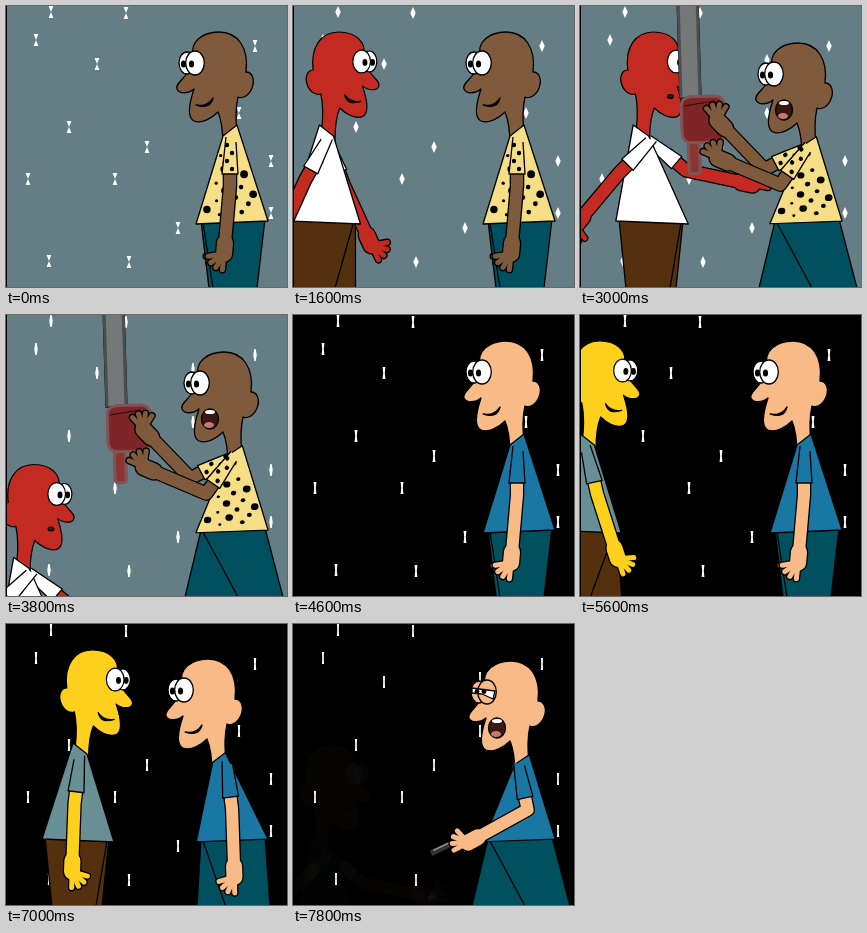
Recreate the animation shown at these times as an HTML page with a canvas. Size 281 by 281 pixels, loop 8000 ms.

```html
<!DOCTYPE html>
<html>
<head>
<meta charset="utf-8">
<style>
html, body { margin: 0; width: 100%; height: 100%; overflow: hidden; background: #000; }
canvas { display: block; width: 100vw; height: 100vh; }
</style>
</head>
<body>
<canvas></canvas>
<script>
const SIZE = 281, LOOP = 8000, STEP = 200, CUT = 4400, SECOND_START = 4600;
const UPPER_ARM = 44, FOREARM = 57;
const canvas = document.querySelector('canvas');
const ctx = canvas.getContext('2d');

// Outlines of the figure, facing left.
const HEAD = new Path2D('M187 50C184 36 196 26 213 26C232 26 243 42 240 66C247 66 249 75 246 82C243 90 236 93 232 91C230 100 229 110 231 128L217 140C217 125 215 113 212 106C206 112 196 118 188 115C180 111 184 95 188 83C182 88 173 88 171 83C169 78 177 74 181 67Z');
const SMILE = new Path2D('M190 99Q201 101 207 92Q204 104 190 99Z');
const SCOWL = new Path2D('M174 53L197 56L195 64L184 59L174 58Z');
const SHIRT = new Path2D('M217 130L231 119L262 215L190 218Z');
const SLEEVE = new Path2D('M-4 -5L-8 32L8 32L6 0');

const SPARKS = [[45, 6], [120, 7], [30, 34], [91, 58], [249, 40], [187, 54], [63, 121],
  [233, 107], [187, 107], [141, 141], [265, 155], [22, 173], [109, 173], [172, 222],
  [265, 207], [43, 255], [123, 256]];

const SCENES = [
  { sky: '#657e85', saw: true, start: -142, arrive: 2240,
    left: { skin: '#c32a22', shirt: '#fff', pants: '#54300f' },
    right: { skin: '#7f5a3c', shirt: '#f5de85', pants: '#00505f', dotted: true },
    aim: { near: [35, 113], far: [62, 136] } },
  { sky: '#000', saw: false, start: -150, arrive: 1800,
    left: { skin: '#fdd01d', shirt: '#688f95', pants: '#54300f' },
    right: { skin: '#f8bb87', shirt: '#1a76a3', pants: '#00505f' },
    aim: { near: [-12, 61], far: [0, 5] } }
];

const mix = (a, b, k) => a + (b - a) * k;
const ramp = (t, from, to) => Math.min(1, Math.max(0, (t - from) / (to - from)));

// A step from a point; 0 degrees is down, 90 is forward (left).
function toward([x, y], degrees, length) {
  const a = degrees * Math.PI / 180;
  return [x - Math.sin(a) * length, y + Math.cos(a) * length];
}

function within(draw) {
  ctx.save();
  draw();
  ctx.restore();
}

function shape(path, fill, outlined = true) {
  ctx.fillStyle = fill;
  ctx.fill(path);
  if (outlined) ctx.stroke(path);
}

function polygon(points, fill, outlined) {
  const path = new Path2D();
  points.forEach(p => path.lineTo(...p));
  path.closePath();
  shape(path, fill, outlined);
}

function oval(x, y, rx, ry, fill, outlined = false) {
  const path = new Path2D();
  path.ellipse(x, y, rx, ry, 0, 0, 7);
  shape(path, fill, outlined);
}

function box(x, y, w, h, r, fill) {
  const path = new Path2D();
  path.roundRect(x, y, w, h, r);
  shape(path, fill);
}

function line(...points) {
  ctx.beginPath();
  points.forEach(p => ctx.lineTo(...p));
  ctx.stroke();
}

// Thick strokes merged under one common outline.
function limbs(strokes, color) {
  within(() => {
    ctx.lineCap = 'round';
    for (const [extra, style] of [[2.6, '#000'], [0, color]]) {
      ctx.strokeStyle = style;
      for (const [width, points] of strokes) {
        ctx.lineWidth = width + extra;
        line(...points);
      }
    }
  });
}

function joints(pose, [upper, fore], dx = 0) {
  const shoulder = [224 + dx + pose.lean * 0.3, 136 + pose.drop * 0.6];
  const elbow = toward(shoulder, upper, UPPER_ARM);
  return { shoulder, elbow, wrist: toward(elbow, fore, FOREARM) };
}

function arm(look, pose, angles, dx) {
  const { shoulder, elbow, wrist } = joints(pose, angles, dx);
  const palm = toward(wrist, angles[1], 11);
  const strokes = [[12, [toward(shoulder, angles[0], 20), elbow, wrist]], [16, [wrist, palm]]];
  for (let i = 0; i < 4; i++) {
    strokes.push([5, [palm, toward(palm, angles[1] + 76 - 25 * i, 16)]]);
  }
  limbs(strokes, look.skin);
  within(() => {
    ctx.translate(...shoulder);
    ctx.rotate(angles[0] * Math.PI / 180);
    shape(SLEEVE, look.shirt);
    if (look.dotted) for (let i = 0; i < 4; i++) oval(i % 2 ? 2 : -3, 3 + 8 * i, 2.2, 2.2, '#000');
  });
}

// Golden-ratio scatter across the widening shirt.
function shirtDots() {
  const count = 17;
  for (let i = 0; i < count; i++) {
    const depth = Math.sqrt((i + 0.5) / count), across = (i * 0.618 + 0.4) % 1;
    const x = mix(mix(222, 196, depth), mix(228, 256, depth), across);
    const r = 2.8 + 1.2 * Math.sin(i * 5);
    oval(x, 124 + 86 * depth, r, r, '#000');
  }
}

function face(look, pose) {
  shape(HEAD, look.skin);
  const height = pose.squint ? 9 : 12;
  for (const [x, rx, ry] of [[181, 8, height - 1], [189, 9.3, height]]) {
    oval(x, 57, rx, ry, pose.angry ? look.skin : '#fff', true);
    if (!pose.angry) oval(x - 3.5, 58, 2.6, 3.6, '#000');
  }
  if (pose.angry) {
    shape(SCOWL, '#fff');
    for (const x of [179, 186]) oval(x, 56.5, 2.4, 2.4, '#000');
  }
  if (pose.shout) {
    oval(199, 93, 8.5, 10, '#3a1712', true);
    oval(198, 99, 5, 3, '#c87870');
    oval(199, 86, 5, 2, '#fff');
  } else if (pose.gasp) {
    oval(195, 94, 3, 2, '#3a1712', true);
  } else {
    shape(SMILE, '#000');
  }
}

function trousers(color, spread) {
  polygon([[195, 215], [259, 213], [mix(251, 277, spread), 282], [mix(203, 179, spread), 282]], color);
  line([197, 217], [mix(207, 232, spread), 282]);
}

function person(look, pose) {
  arm(look, pose, pose.far, -2);
  trousers(look.pants, pose.spread);
  within(() => {
    ctx.translate(pose.lean, pose.drop);
    // The head scales about the forehead.
    ctx.translate(185, 26);
    ctx.scale(pose.headSize, pose.headSize);
    ctx.translate(-185, -26);
    face(look, pose);
  });
  within(() => {
    // Shear the torso so the hem stays put while the collar follows the head.
    const kx = pose.lean / 91, ky = pose.drop / 91;
    ctx.transform(1, 0, -kx, 1 - ky, 216 * kx, 216 * ky);
    shape(SHIRT, look.shirt);
    if (look.dotted) shirtDots();
  });
  if (pose.armed) return;
  arm(look, pose, pose.near);
}

function visitor(scene, u) {
  const x = scene.start * (1 - ramp(u, 0, scene.arrive));
  const swing = Math.cos((x + 16) * Math.PI / 30);
  const shock = ramp(u, 2600, 2800);
  const fall = scene.saw ? 2.6 * ramp(u, 3400, 4200) : ramp(u, 2800, 3200);
  const near = mix(30 * swing - 4, -45, shock), far = -28 * swing - 4;
  within(() => {
    if (!scene.saw) ctx.globalAlpha = mix(1, 0.02, ramp(u, 2800, 3200));
    ctx.translate(298 + x - 35 * fall, 95 * fall);
    ctx.scale(-1, 1);
    person(scene.left, {
      headSize: 0.95, lean: 13 * shock, drop: 0, gasp: shock > 0,
      near: [near, near + 5], far: [mix(far, 50, shock), mix(far + 5, 78, shock)],
      spread: swing > 0 ? swing : -0.4 * swing,
      squint: !scene.saw && u >= 1400 && u < 1800
    });
  });
}

function chainsaw([x, y], shake) {
  within(() => {
    ctx.translate(x - 25 + shake, y - 5);
    ctx.rotate(-0.03);
    box(-22, -220, 21, 160, 0, '#747879');
    ctx.lineWidth = 3;
    ctx.strokeStyle = '#4b4d4e';
    for (const edge of [-21, -2]) line([edge, -220], [edge, -60]);
    ctx.strokeStyle = '#805354';
    box(-15, -16, 11, 32, 3, scene => 0);
    box(-15, -16, 11, 32, 3, '#8d3330');
    box(-21, -61, 43, 46, 9, '#7f2527');
    ctx.lineWidth = 1;
    ctx.strokeStyle = '#2a0c0c';
    line([-18, -52], [12, -56], [18, -48]);
  });
}

function pistol([x, y]) {
  within(() => {
    ctx.translate(x - 12, y + 2);
    ctx.rotate(-0.45);
    box(-38, -6, 40, 7, 1, '#333');
    box(-6, 0, 6, 12, 1, '#222');
    ctx.strokeStyle = '#999';
    line([-34, -4], [-2, -4]);
  });
}

function host(scene, u) {
  const notice = ramp(u, 1800, 2200), reach = ramp(u, 2400, 2800), lunge = ramp(u, 2600, 2800);
  const aim = angles => angles.map((angle, i) => mix(5 * i - 7 * notice, angle, reach));
  const look = scene.right;
  const pose = {
    headSize: 1,
    lean: mix(-11 * notice, 5, lunge),
    drop: mix(9 * notice, 11, lunge),
    spread: mix(0.5 * notice, 1, lunge),
    near: aim(scene.aim.near), far: aim(scene.aim.far),
    armed: reach > 0, shout: reach === 1, angry: reach === 1 && !scene.saw
  };
  const { wrist } = joints(pose, pose.near);
  if (pose.armed && scene.saw) chainsaw(wrist, u / STEP % 2);
  person(look, pose);
  if (!pose.armed) return;
  if (!scene.saw) pistol(wrist);
  arm(look, pose, pose.near);
}

function sparkles(t) {
  const open = ramp(t, 0, 1600), close = ramp(t, 3000, 4600);
  const end = 2.4 - 2.4 * open + 1.4 * close - 0.4 * ramp(t, 6200, 7800);
  const mid = 2.7 * open - 1.9 * close;
  for (const [x, y] of SPARKS) {
    polygon([[x - end, y - 6], [x + end, y - 6], [x + mid, y], [x + end, y + 6],
      [x - end, y + 6], [x - mid, y]], '#fff', false);
  }
}

function draw(t) {
  const second = t >= CUT;
  const scene = SCENES[second ? 1 : 0];
  const u = second ? t - SECOND_START : t;
  ctx.fillStyle = scene.sky;
  ctx.fillRect(0, 0, SIZE, SIZE);
  ctx.strokeStyle = '#000';
  ctx.lineWidth = 1.3;
  ctx.lineJoin = 'round';
  sparkles(t);
  visitor(scene, u);
  host(scene, u);
  ctx.fillStyle = '#000';
  ctx.fillRect(0, 0, 1, SIZE);
}

function frame(now) {
  const ratio = devicePixelRatio || 1;
  const w = Math.round(innerWidth * ratio), h = Math.round(innerHeight * ratio);
  if (canvas.width !== w || canvas.height !== h) {
    canvas.width = w;
    canvas.height = h;
  }
  ctx.setTransform(w / SIZE, 0, 0, h / SIZE, 0, 0);
  draw(Math.floor(now % LOOP / STEP) * STEP);
  requestAnimationFrame(frame);
}
requestAnimationFrame(frame);
</script>
</body>
</html>
```
